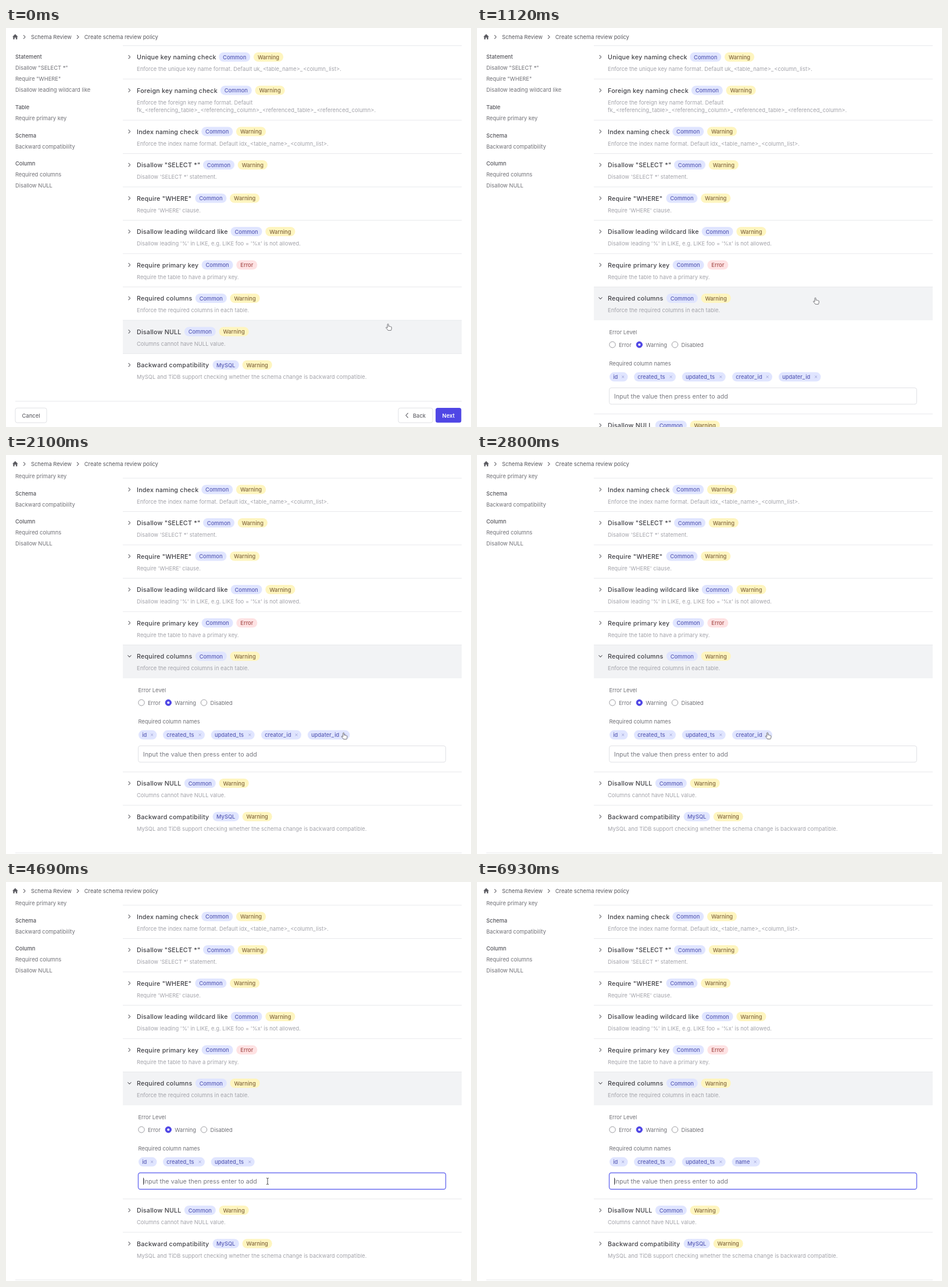
Write an HTML page that moves like this. It is 800 px wide and 688 px high and loops after 7 s.

```html
<!DOCTYPE html>
<html lang="en">
<head>
<meta charset="utf-8">
<title>Schema review policy</title>
<style>
html, body { margin: 0; width: 100%; height: 100%; overflow: hidden; background: #fff; }
svg { display: block; width: 100vw; height: 100vh; }
text { font: 400 9.33px Inter, sans-serif; fill: #707076; white-space: pre; }
.title { font-size: 10.67px; font-weight: 500; letter-spacing: .24px; fill: #404046; }
.desc { letter-spacing: .035px; fill: #a2a2a9; }
.head { font-weight: 500; fill: #56565c; }
.crumb { fill: #57575d; }
.tag { font-weight: 500; text-anchor: middle; }
.chip { font-weight: 500; fill: #5a5eb6; }
.field { font-size: 10.67px; letter-spacing: .04px; fill: #787980; }
.typed { fill: #404046; }
.wide { letter-spacing: 1px; }
.btn { font-weight: 500; fill: #66666c; text-anchor: middle; }
.primary { font-weight: 600; fill: #fff; }
.rule { stroke: #e8e9ec; stroke-width: 1; }
.arrow { fill: none; stroke: #55555b; stroke-width: 1.05; stroke-linecap: round; stroke-linejoin: round; }
.box { fill: #fff; stroke: #e0e1e5; }
</style>
</head>
<body>
<svg id="stage" viewBox="0 0 800 688" preserveAspectRatio="none"></svg>
<script>
const LOOP = 7000, STEP = 70, PANEL = 161.5, SCROLL = 119;
const svg = document.getElementById('stage');
const $ = id => document.getElementById(id);

// underscores get a little extra room
const mark = s => s.replace(/&/g, '&amp;').replace(/</g, '&lt;')
  .replace(/_/g, '<tspan class="wide">_</tspan>');
// y is the middle of the capital letters
const text = (x, y, s, cls = '', size = 9.33) =>
  `<text x="${x}" y="${y + size * 0.395}" class="${cls}">${mark(s)}</text>`;
const rect = (x, y, w, h, attrs) =>
  `<rect x="${x}" y="${y}" width="${w}" height="${h}" ${attrs}/>`;
const rule = (x, y) => `<path class="rule" d="M${x} ${y}H784"/>`;
const chevron = (x, y, id = '') =>
  `<path ${id && `id="${id}"`} class="arrow" d="M${x - 1.5} ${y - 2.8}l2.8 2.8-2.8 2.8"/>`;

const TAGS = {
  Common: [54, '#e0e5ff', '#5a5eb6'],
  MySQL: [45.4, '#e0e5ff', '#5a5eb6'],
  Warning: [51.2, '#fef5bf', '#846940'],
  Error: [36, '#fee2e3', '#a8504f']
};
function tag(cx, y, name) {
  const [w, bg, ink] = TAGS[name];
  return rect(cx - w / 2, y - 8, w, 16, `rx="8" fill="${bg}"`) +
    `<text class="tag" x="${cx}" y="${y + 3.65}" style="fill:${ink}">${name}</text>`;
}

// title middle, first tag centre, title, level, description lines
const ROWS = [
  [50, 393.2, 'Unique key naming check', 'Warning', 'Enforce the unique key name format. Default uk_<table_name>_<column_list>.'],
  [107.5, 395.8, 'Foreign key naming check', 'Warning', 'Enforce the foreign key name format. Default',
    'fk_<referencing_table>_<referencing_column>_<referenced_table>_<referenced_column>.'],
  [178.5, 363.2, 'Index naming check', 'Warning', 'Enforce the index name format. Default idx_<table_name>_<column_list>.'],
  [236, 366, 'Disallow "SELECT *"', 'Warning', "Disallow 'SELECT *' statement."],
  [293.5, 352.4, 'Require "WHERE"', 'Warning', "Require 'WHERE' clause."],
  [351, 413.6, 'Disallow leading wildcard like', 'Warning', "Disallow leading '%' in LIKE, e.g. LIKE foo = '%x' is not allowed."],
  [408.5, 363.6, 'Require primary key', 'Error', 'Require the table to have a primary key.'],
  [466, 352.8, 'Required columns', 'Warning', 'Enforce the required columns in each table.'],
  [523.5, 333.8, 'Disallow NULL', 'Warning', 'Columns cannot have NULL value.'],
  [581, 378.2, 'Backward compatibility', 'Warning', 'MySQL and TiDB support checking whether the schema change is backward compatible.']
];
function row([y, cx, title, level, ...desc], i) {
  const kind = i === 9 ? 'MySQL' : 'Common';
  const next = cx + TAGS[kind][0] / 2 + 5.7 + TAGS[level][0] / 2;
  return rule(201, y - 19.5) + chevron(212.4, y, i === 7 ? 'fold' : '') +
    text(225, y, title, 'title', 10.67) + tag(cx, y, kind) + tag(next, y, level) +
    desc.map((d, k) => text(225, y + 20.5 + k * 13.5, d, 'desc')).join('');
}

const SIDE = [
  [49.5, 'Statement', 'Disallow "SELECT *"', 'Require "WHERE"', 'Disallow leading wildcard like'],
  [136, 'Table', 'Require primary key'],
  [185, 'Schema', 'Backward compatibility'],
  [233.5, 'Column', 'Required columns', 'Disallow NULL']
];
const side = SIDE.map(([y, ...items]) =>
  items.map((s, k) => text(16, y + k * 19, s, k ? '' : 'head')).join('')).join('');

const CHIPS = [
  [228, 31.5, 'id'], [270, 72, 'created_ts'], [352.7, 75, 'updated_ts'],
  [439, 69, 'creator_id'], [519, 72.5, 'updater_id'], [438.5, 48.5, 'name']
];
const chip = ([x, w, s]) => `<g id="chip-${s}">` +
  rect(x, 593.6, w, 16, 'rx="8" fill="#e0e5ff"') + text(x + 6.2, 601.5, s, 'chip') +
  `<path d="M${x + w - 10.3} 599.6l3.8 3.8m0-3.8l-3.8 3.8" stroke="#999ed3" stroke-width=".9"/></g>`;

const radio = (x, label, on) =>
  `<circle cx="${x}" cy="546" r="5.2" fill="${on ? '#4f46e5' : '#fff'}" stroke="${on ? '#4f46e5' : '#929298'}" stroke-width=".9"/>` +
  (on ? `<circle cx="${x}" cy="546" r="2.1" fill="#fff"/>` : '') + text(x + 11, 546, label);

const panel = text(227.5, 524.5, 'Error Level') +
  radio(233, 'Error') + radio(279.3, 'Warning', true) + radio(340.5, 'Disabled') +
  text(227.5, 578.8, 'Required column names') + CHIPS.map(chip).join('') +
  rect(227.5, 620.5, 529, 28.2, 'id="input" class="box" rx="3.5"') +
  text(235.8, 635, 'Input the value then press enter to add', 'field', 10.67).replace('<text', '<text id="hint"') +
  text(235.8, 635, '', 'field typed', 10.67).replace('<text', '<text id="typed"') +
  '<path id="caret" d="M0 629v12" stroke="#404046" stroke-width="1"/>';

const footer = rule(16, 643.5) +
  rect(16, 655.2, 54, 25.5, 'class="box" rx="3.5"') + text(43, 668, 'Cancel', 'btn') +
  rect(675, 655.2, 59, 25.5, 'class="box" rx="3.5"') + text(711, 668, 'Back', 'btn') +
  '<path class="arrow" d="M691.5 664.2l-3.6 3.8 3.6 3.8"/>' +
  rect(739.1, 655.1, 44.2, 25.5, 'rx="3.5" fill="#4f46e5"') + text(761.2, 668, 'Next', 'btn primary');

const rows = ROWS.map(row);
svg.innerHTML = `
  <clipPath id="view"><rect y="30" width="800" height="658"/></clipPath>
  <rect width="800" height="688" fill="#fff"/>
  <g clip-path="url(#view)"><g id="page">
    ${rect(201, 0, 583, 57.5, 'id="hover" fill="#f2f3f5"')}
    ${side}${rows.slice(0, 8).join('')}
    <g id="panel">${panel}</g>
    <g id="tail">${rows.slice(8).join('')}${footer}</g>
  </g></g>
  <path d="M15.8 10.6l4.8 4.6h-1.3v4.2h-2.4v-2.8h-2.2v2.8h-2.4v-4.2H11z" fill="#5c5c62"/>
  ${chevron(31.8, 15.5)}${text(43, 15.5, 'Schema Review', 'crumb')}
  ${chevron(123.8, 15.5)}${text(134.8, 15.5, 'Create schema review policy', 'crumb')}
  <g id="cursor">
    <path id="hand" d="M-2.3 1V-4.3a1 1 0 0 1 2 0V-1.2q1.5-.6 1.8.3 1.5-.5 1.8.5 1.4-.3 1.6.9V2.4q0 1.6-1 3.4H-1.2Q-2.5 4-4.6 1.6-5 .4-4 .4-3.2.4-2.3 1.6z"
      fill="#fff" stroke="#626268" stroke-width=".9" stroke-linejoin="round"/>
    <path id="point" d="M-2.2-5v8.2l1.9-1.7 1.3 2.9 1.3-.6-1.3-2.8h2.6z" fill="#111" stroke="#fff" stroke-width=".6"/>
    <path id="beam" d="M-2-5.5q2 0 2 1.2V4.3q0 1.2-2 1.2M2-5.5q-2 0-2 1.2M2 5.5q-2 0-2-1.2" fill="none" stroke="#333" stroke-width=".9"/>
  </g>`;

// time, x, y, pointer shape from then on
const MOVES = [
  [0, 658.5, 515.6, 'hand'], [70, 658.5, 515.6, 'hand'], [840, 583.4, 470.5, 'hand'], [1470, 583.4, 470.5, 'hand'],
  [1890, 582, 484.3, 'hand'], [2310, 582, 484.3, 'point'], [2730, 501, 484, 'hand'],
  [3150, 501, 484, 'point'], [3570, 493, 498, 'point'], [3710, 491, 501, 'point'],
  [3920, 491, 501, 'point'], [4130, 450, 516, 'beam'], [LOOP, 450, 516, 'beam']
];
const KEYS = [4760, 4900, 5040, 5250];
const OPEN = 980, DROP_UPDATER = 2240, DROP_CREATOR = 2940, FOCUS = 4200, ENTER = 5530;

const ease = p => { p = Math.min(1, Math.max(0, p)); return p * p * (3 - 2 * p); };
const show = (id, on) => $(id).setAttribute('display', on ? 'inline' : 'none');
const shift = (id, x, y) => $(id).setAttribute('transform', `translate(${x} ${y})`);

function pointer(t) {
  const i = MOVES.findIndex((m, k) => k && t < m[0]) - 1;
  const [t0, x0, y0, shape] = MOVES[i], [t1, x1, y1] = MOVES[i + 1];
  const p = ease((t - t0) / (t1 - t0));
  return { x: x0 + (x1 - x0) * p, y: y0 + (y1 - y0) * p, shape };
}

function draw(t) {
  const open = t >= OPEN, focus = t >= FOCUS, cur = pointer(t);
  shift('page', 0, -SCROLL * ease((t - 1120) / 140));
  shift('tail', 0, open ? PANEL : 0);
  show('panel', open);
  $('fold').setAttribute('transform', open ? 'rotate(90 212.4 466)' : '');
  $('hover').setAttribute('y', open || cur.y < 504 ? 446.5 : 504);

  show('chip-updater_id', t < DROP_UPDATER);
  show('chip-creator_id', t < DROP_CREATOR);
  show('chip-name', t >= ENTER);

  const typed = t < ENTER ? 'name'.slice(0, KEYS.filter(k => t >= k).length) : '';
  $('typed').textContent = typed;
  show('hint', !typed);
  $('input').style.stroke = focus ? '#6c6ff0' : '';
  $('input').style.strokeWidth = focus ? 1.4 : 1;
  show('caret', focus && (t < 5810 || t >= 6230));
  shift('caret', 236.6 + (typed ? $('typed').getComputedTextLength() : 0), 0);

  show('cursor', t < KEYS[0]);
  shift('cursor', cur.x, cur.y);
  for (const s of ['hand', 'point', 'beam']) show(s, s === cur.shape);
}

function tick() {
  const t = performance.now() % LOOP;
  draw(Math.floor(t / STEP) * STEP);
  requestAnimationFrame(tick);
}
tick();
</script>
</body>
</html>
```
